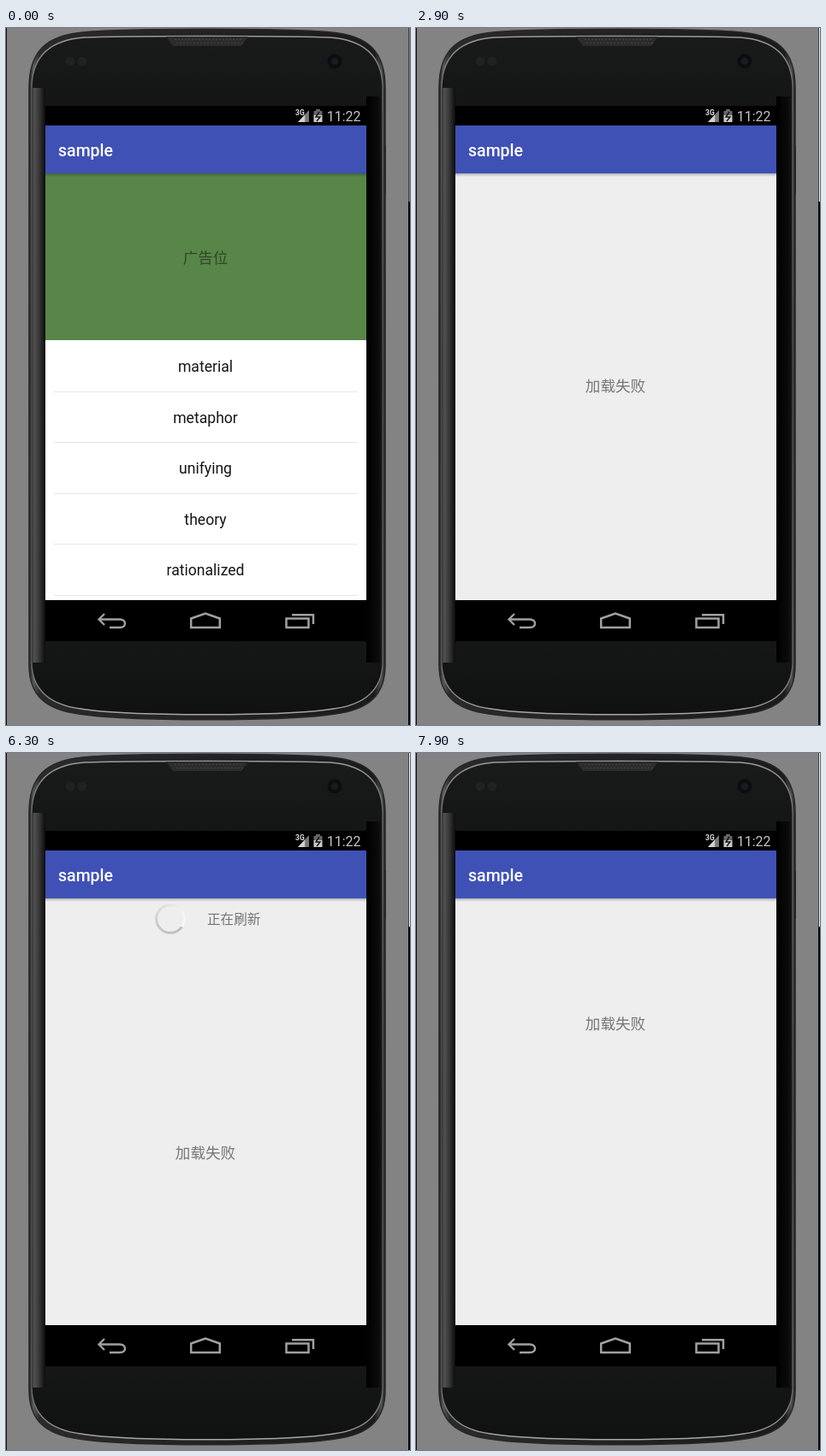
These frames come from a looping animation (472x815 px, 8000 ms). An HTML page with a canvas:

```html
<!DOCTYPE html>
<html lang="zh">
<head>
<meta charset="utf-8">
<title>Pull to refresh</title>
<style>
html, body { margin: 0; width: 100%; height: 100%; overflow: hidden; background: #838383; }
canvas { display: block; width: 472px; height: 815px; }
</style>
</head>
<body>
<canvas id="stage" width="472" height="815"></canvas>
<script>
const ctx = document.getElementById('stage').getContext('2d');
const LOOP = 8000, STEP = 100;
const LEFT = 46, TOP = 170, WIDTH = 375, BOTTOM = 669, CENTER = 233;
const HEADER = 49, BANNER = 195, ROW = 59.6;
const LATIN = 'Roboto, "Noto Sans CJK SC", "Noto Sans CJK", sans-serif';
const CJK = '"Noto Sans CJK SC", "Noto Sans CJK", sans-serif';
const WORDS = ['material', 'metaphor', 'unifying', 'theory', 'rationalized', 'space'];

// [time, value] pairs, linear in between
const OFFSET = [
  [2100, 0], [2200, -71], [2300, -108], [2400, -120], [2500, -96], [2600, -52],
  [2700, -21], [2800, -6], [2900, 0],
  [3000, 0], [3100, 8], [3200, 30], [3300, 58], [3400, 88], [3500, 110], [3600, 116],
  [3700, 114], [3800, 86], [3900, 62], [4000, 54], [4100, 50], [4200, HEADER],
  [6400, HEADER], [6500, 36], [6600, 17], [6700, 5], [6800, 1], [6900, 0],
  [7700, 0], [7800, -58], [7900, -102]
];
const LIST_ALPHA = [
  [1300, 1], [1900, 0], [6400, 0], [6500, .6], [6600, .85], [6700, 1], [7100, 1], [7700, 0]
];
const PAPER = [[6400, 0], [6700, .65], [6900, 1]];

function track(keys, t) {
  if (t <= keys[0][0]) return keys[0][1];
  for (let i = 1; i < keys.length; i++) {
    const [t0, a] = keys[i - 1], [t1, b] = keys[i];
    if (t <= t1) return a + (b - a) * (t - t0) / (t1 - t0);
  }
  return keys[keys.length - 1][1];
}

function rect(color, x, y, w, h) {
  ctx.fillStyle = color;
  ctx.fillRect(x, y, w, h);
}

function fade(x0, y0, x1, y1, ...stops) {
  const g = ctx.createLinearGradient(x0, y0, x1, y1);
  stops.forEach(([p, c]) => g.addColorStop(p, c));
  return g;
}

function line(d, color, width) {
  ctx.strokeStyle = color;
  ctx.lineWidth = width;
  ctx.stroke(new Path2D(d));
}

function dot(color, x, y, r) {
  ctx.fillStyle = color;
  ctx.beginPath();
  ctx.arc(x, y, r, 0, Math.PI * 2);
  ctx.fill();
}

function text(str, x, y, size, color, align = 'center', family = LATIN, weight = 400) {
  ctx.font = `${weight} ${size}px ${family}`;
  ctx.textAlign = align;
  ctx.fillStyle = color;
  ctx.fillText(str, x, y);
}

function drawPhone(t) {
  rect('#838383', 0, 0, 472, 815);
  rect('#111', 0, 0, 1, 815);
  rect('#444', 470, 0, 1, 815);
  rect(t < 1400 ? '#777' : '#eee', 471, 0, 1, 203);
  rect('#000', 470, 203, 2, 612);
  rect('#333', 442, 138, 2, 56);

  const body = new Path2D('M27 70C27 28 46 9 90 5C145 0 325 0 380 5C424 9 443 28 443 70' +
    'V745C443 780 424 797 385 802C330 811 140 811 85 802C46 797 27 780 27 745Z');
  ctx.fillStyle = fade(27, 0, 443, 0, [0, '#202020'], [.012, '#5a5a5a'], [.03, '#2a2a2a'],
    [.97, '#1b1b1b'], [.99, '#505050'], [1, '#222']);
  ctx.fill(body);
  ctx.strokeStyle = '#262626';
  ctx.lineWidth = 1.5;
  ctx.stroke(body);

  const face = new Path2D('M30 68C31 34 50 14 92 11C145 9 325 9 378 11C420 14 439 34 440 68' +
    'V743C439 774 420 791 383 796C330 805 140 805 87 796C50 791 31 774 30 743Z');
  ctx.fillStyle = fade(0, 10, 0, 805, [0, '#191a1a'], [.1, '#141515'], [.5, '#0b0c0c'],
    [.89, '#151717'], [1, '#101111']);
  ctx.fill(face);
  ctx.strokeStyle = fade(0, 10, 0, 805, [0, '#9a9a9a'], [.08, '#6a6a6a'], [.5, '#4c4c4c'],
    [.92, '#666'], [1, '#aaa']);
  ctx.lineWidth = 1.3;
  ctx.stroke(face);

  rect(fade(29, 0, 46, 0, [0, '#303030'], [.25, '#505050'], [.6, '#343434'], [1, '#0c0c0c']),
    30, 70, 16, 672);
  rect(fade(421, 0, 440, 0, [0, '#000'], [.75, '#0b0b0b'], [1, '#1c1c1c']), 421, 80, 18, 662);

  ctx.fillStyle = '#2c2c2c';
  ctx.fill(new Path2D('M187 10H283L275 21H195Z'));
  for (let x = 197; x < 275; x += 4) {
    rect('#414141', x, 13, 2, 1);
    rect('#414141', x + 2, 17, 2, 1);
  }
  dot('#202121', 75, 39, 5.5);
  dot('#202121', 89, 39, 5.5);
  dot('#0d0d0f', 384, 39, 8.5);
  dot('#1b1c22', 384, 39, 4);
}

function drawBars() {
  rect('#000', LEFT, 91, WIDTH, 23);
  text('3G', 338, 102, 8.5, '#ddd', 'left', LATIN, 700);
  ctx.fillStyle = fade(341, 0, 355, 0, [0, '#ddd'], [.6, '#ccc'], [.61, '#777'], [1, '#777']);
  ctx.fill(new Path2D('M341 110L354 96V110Z'));
  rect('#666', 362, 95, 5, 2);
  rect('#666', 359.5, 97, 10, 5);
  rect('#ccc', 359.5, 102, 10, 8);
  line('M366 98L362 104H367L363 109', '#111', 1.4);
  text('11:22', 414.5, 109, 16, '#c4c4c4', 'right');

  rect(fade(0, TOP, 0, TOP + 4, [0, 'rgba(0,0,0,.25)'], [1, 'rgba(0,0,0,0)']), LEFT, TOP, WIDTH, 4);
  rect('#3f51b5', LEFT, 114, WIDTH, TOP - 114);
  text('sample', 61, 150, 19.5, '#fff', 'left', LATIN, 500);

  rect('#000', LEFT, BOTTOM, WIDTH, 48);
  const icon = '#a0a0a0';
  line('M115 685L108.5 691.5L115 698M109 691.5H133C141 691.5 141 701 133 701H121', icon, 2.4);
  line('M216.2 701V690.5L233 684.5L249.8 690.5V701Z', icon, 2.5);
  line('M327.5 690.5H353.5V701H327.5ZM334 686.2H359V697', icon, 2.5);
}

function drawArrow(x, y, turn) {
  ctx.save();
  ctx.translate(x, y);
  ctx.rotate(turn);
  line('M0 -14.5V14M-8.5 5.5L0 14L8.5 5.5', '#929292', 2.3);
  ctx.restore();
}

function drawSpinner(x, y, t) {
  const start = (t - 4900) / 1250 * Math.PI * 2 - .15;
  const g = ctx.createConicGradient(start, x, y);
  g.addColorStop(0, '#bdbdbd');
  g.addColorStop(.3, '#c8c8c8');
  g.addColorStop(.85, '#f5f5f5');
  g.addColorStop(1, '#f8f8f8');
  ctx.strokeStyle = g;
  ctx.lineWidth = 3;
  ctx.beginPath();
  ctx.arc(x, y, 16.3, 0, Math.PI * 2);
  ctx.stroke();
}

function drawHeader(t, offset) {
  const y = TOP + offset - 24.5;
  const busy = t >= 4000;
  if (busy) {
    drawSpinner(192, y - .5, t);
  } else {
    const flip = Math.min(1, Math.max(0, (t - 3350) / 177));
    drawArrow(193, y, -Math.PI * flip);
  }
  const label = busy ? '正在刷新' : t < 3350 ? '下拉刷新' : '释放刷新';
  text(label, busy ? 235 : 236, y + 5.5, 15.6, '#747474', 'left', CJK);
}

function drawList(t, offset) {
  const y = TOP + offset, first = y + BANNER;
  const paper = t > 6000 ? track(PAPER, t) : 1;
  const items = t > 6000 ? ['刷新', ...WORDS] : WORDS;
  const alpha = ctx.globalAlpha;
  ctx.globalAlpha = alpha * paper;
  rect('#fff', LEFT, TOP, WIDTH, BOTTOM - TOP);
  ctx.globalAlpha = alpha;
  rect('#588548', LEFT, y, WIDTH, BANNER);
  text('广告位', CENTER, y + 104.5, 17.5, '#2f4828', 'center', CJK);
  items.forEach((word, i) => {
    const top = first + i * ROW;
    text(word, CENTER, top + 37, 17.6, '#161616');
    rect('#e6e6e6', 56, Math.round(top + ROW), 355, 1);
  });
}

function draw(t) {
  const offset = track(OFFSET, t);
  const shown = track(LIST_ALPHA, t);
  drawPhone(t);

  ctx.save();
  ctx.beginPath();
  ctx.rect(LEFT, TOP, WIDTH, BOTTOM - TOP);
  ctx.clip();
  rect('#eee', LEFT, TOP, WIDTH, BOTTOM - TOP);
  if (shown < 1) {
    ctx.globalAlpha = 1 - shown;
    text('加载失败', CENTER, 425 + offset, 17.6, '#787878', 'center', CJK);
    ctx.globalAlpha = 1;
    if (offset > 0) drawHeader(t, offset);
  }
  if (shown > 0) {
    ctx.globalAlpha = shown;
    drawList(t, offset);
  }
  ctx.restore();
  drawBars();
}

const begin = performance.now();
function tick() {
  const t = (performance.now() - begin) % LOOP;
  draw(Math.floor(t / STEP) * STEP);
  requestAnimationFrame(tick);
}
tick();
</script>
</body>
</html>
```
